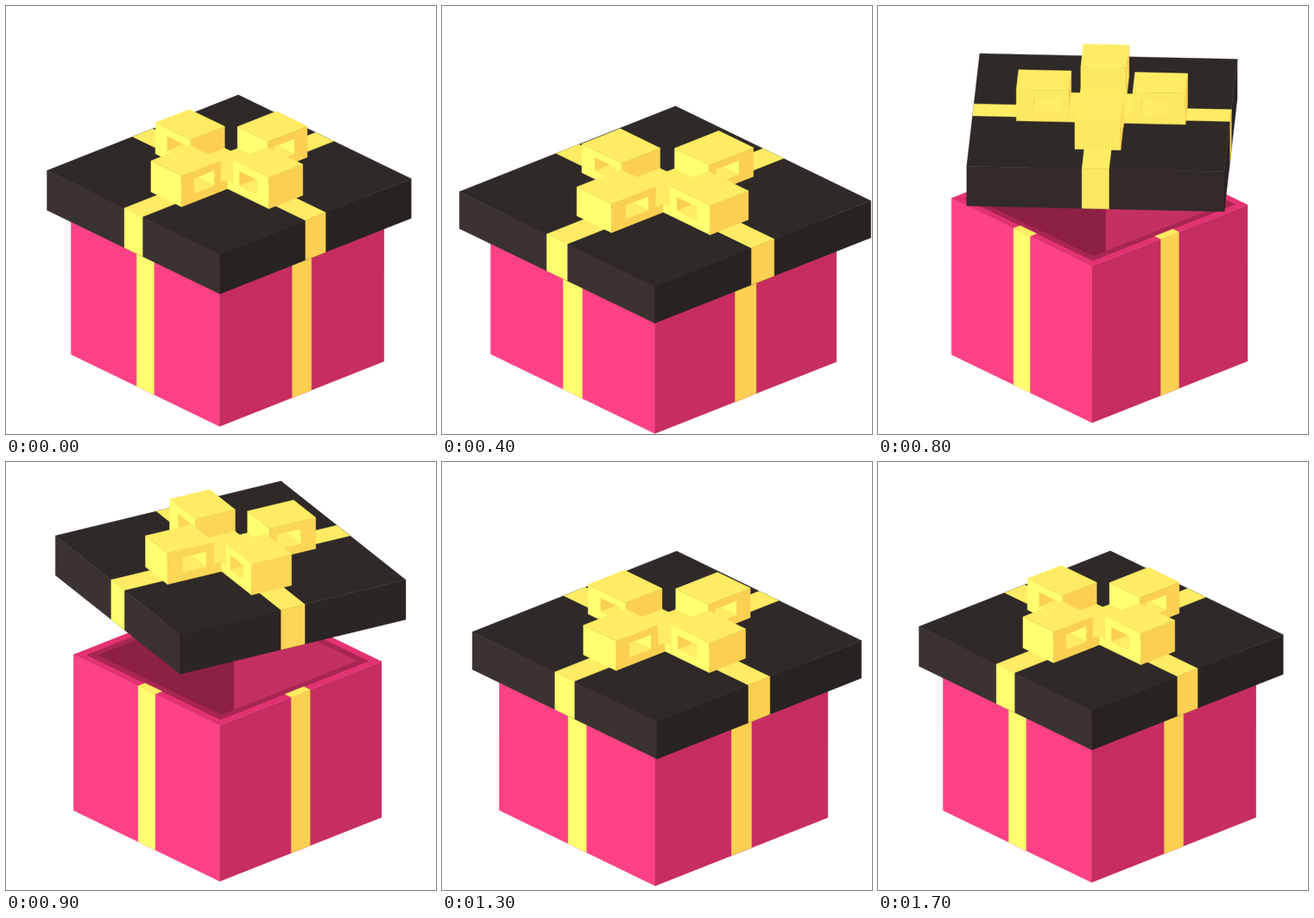
These frames come from a looping animation (498 px wide and 495 px high, 1800 ms). An HTML page with a canvas:

```html
<!DOCTYPE html>
<html>
<head>
<meta charset="utf-8">
<title>Gift box</title>
<style>
  html, body { margin: 0; overflow: hidden; background: #fff; }
  canvas { display: block; }
</style>
</head>
<body>
<canvas id="stage" width="498" height="495"></canvas>
<script>
const ctx = document.getElementById('stage').getContext('2d');
const LOOP = 1800, STEP = 100, QUARTER = Math.PI / 2;
const YAW = 42.1 * Math.PI / 180, SIN_PITCH = 0.437, COS_PITCH = 0.9;

// Colours as [top, left side, right side]
const PINK = [[226, 50, 113], [255, 66, 133], [198, 45, 97]];
const DARK = [[47, 42, 40], [59, 51, 48], [40, 35, 33]];
const GOLD = [[255, 236, 100], [255, 255, 112], [251, 208, 82]];
const LIP = [168, 38, 82], INSIDE_DARK = [140, 32, 69], INSIDE_LIGHT = [196, 48, 98];

const clamp = u => Math.max(0, Math.min(1, u));
const inOut = u => (1 - Math.cos(Math.PI * u)) / 2;
const out = u => 1 - (1 - u) ** 1.67;

// Every motion is a sum of 0-to-1 ramps over the phases of the jump
function poseAt(t) {
  const ramp = (from, to, ease = inOut) => ease(clamp((t - from) / (to - from)));
  const recover = ramp(1400, 1700);
  const crouch = ramp(0, 400) - ramp(400, 600);
  const stretch = ramp(400, 600) - ramp(600, 1000);
  const fall = ramp(1000, 1400);
  const land = fall - recover;
  const press = ramp(1200, 1400) - recover;
  const turn = ramp(600, 1000);
  return {
    body: {
      wide: 1 + 0.105 * crouch - 0.108 * stretch + 0.1 * press,
      tall: 1 - 0.13 * crouch + 0.01 * stretch - 0.12 * press
    },
    lid: {
      x: 258.4 + 2 * (turn - recover),
      y: 195 + 25 * ramp(0, 400) - 115 * ramp(400, 1000, out) + 113 * fall - 23 * recover,
      wide: 1 + 0.13 * crouch + 0.08 * land,
      tall: 1 - 0.07 * crouch - 0.06 * land,
      // The lid looks the same after every quarter turn
      yaw: (YAW + QUARTER * turn) % QUARTER
    }
  };
}

// Orthographic view: r runs back-right, l runs back-left, h runs up
function view(cx, cy, wide, tall, yaw) {
  const c = Math.cos(yaw), s = Math.sin(yaw);
  const project = ([r, l, h]) => [
    cx + wide * (r * c - l * s),
    cy - wide * SIN_PITCH * (r * s + l * c) - tall * COS_PITCH * h
  ];
  const shade = (palette, nx) => {
    const u = clamp((nx + Math.cos(YAW)) / (Math.cos(YAW) + Math.sin(YAW)));
    return palette[1].map((a, i) => a + (palette[2][i] - a) * u);
  };
  return {
    project,
    top: p => p[0],
    left: p => shade(p, -c),
    right: p => shade(p, s)
  };
}

function trace(v, corners) {
  ctx.beginPath();
  corners.forEach(c => ctx.lineTo(...v.project(c)));
  ctx.closePath();
}

function poly(v, color, corners) {
  trace(v, corners);
  ctx.fillStyle = ctx.strokeStyle = `rgb(${color.map(Math.round)})`;
  ctx.lineWidth = 0.4;
  ctx.fill();
  ctx.stroke();
}

function clipped(v, corners, paint) {
  ctx.save();
  trace(v, corners);
  ctx.clip();
  paint();
  ctx.restore();
}

const flat = (r0, r1, l0, l1, h) => [[r0, l0, h], [r1, l0, h], [r1, l1, h], [r0, l1, h]];
const leftWall = (r, l0, l1, h0, h1) => [[r, l0, h0], [r, l1, h0], [r, l1, h1], [r, l0, h1]];
const rightWall = (l, r0, r1, h0, h1) => [[r0, l, h0], [r1, l, h0], [r1, l, h1], [r0, l, h1]];

function block(v, p, r0, r1, l0, l1, h0, h1) {
  poly(v, v.left(p), leftWall(r0, l0, l1, h0, h1));
  poly(v, v.right(p), rightWall(l0, r0, r1, h0, h1));
  poly(v, v.top(p), flat(r0, r1, l0, l1, h1));
}

function bandSides(v, half, w, h0, h1) {
  poly(v, v.left(GOLD), leftWall(-half, -w, w, h0, h1));
  poly(v, v.right(GOLD), rightWall(-half, -w, w, h0, h1));
}

// Gold strips on top, from one distance to another along both axes
function bandTops(v, from, to, w, h) {
  poly(v, v.top(GOLD), flat(from, to, -w, w, h));
  poly(v, v.top(GOLD), flat(-w, w, from, to, h));
}

const BOW = { near: 37, far: 98, w: 26.5, height: 40, knot: 12, depth: 45 };

// One bow loop: a block along r or l with a recess in its open side
function bowLoop(v, alongR, sign) {
  const { near, far, w, height, knot, depth } = BOW;
  const span = (a, b) => sign > 0 ? [a, b] : [-b, -a];
  const bar = (a, b, h) => alongR
    ? block(v, GOLD, ...span(a, b), -w, w, 0, h)
    : block(v, GOLD, -w, w, ...span(a, b), 0, h);
  const [a, b] = span(near + 10, far - 20), low = 11, high = 30;
  const wall = inset => alongR
    ? rightWall(inset - w, a, b, low, high)
    : leftWall(inset - w, a, b, low, high);
  const floor = alongR
    ? flat(a, b, -w, depth - w, low)
    : flat(-w, depth - w, a, b, low);

  if (sign < 0) bar(w, near, knot);
  bar(near, far, height);
  clipped(v, wall(0), () => {
    poly(v, alongR ? v.left(GOLD) : v.right(GOLD), wall(0));
    poly(v, alongR ? v.right(GOLD) : v.left(GOLD), wall(depth));
    poly(v, v.top(GOLD), floor);
  });
  if (sign > 0) bar(w, near, knot);
}

function drawBody({ wide, tall }) {
  const v = view(256.6, 407, wide, tall, YAW);
  const s = 128.3, h = 200, w = 14.9, rim = s - 11, well = s - 20;
  const opening = flat(-well, well, -well, well, h);
  block(v, PINK, -s, s, -s, s, 0, h);
  poly(v, LIP, flat(-rim, rim, -rim, rim, h));
  clipped(v, opening, () => {
    poly(v, INSIDE_DARK, opening);
    poly(v, INSIDE_LIGHT, leftWall(well, -s, well, 0, h));
  });
  bandSides(v, s, w, 0, h);
  bandTops(v, -s, -rim, w, h);
}

function drawLid({ x, y, wide, tall, yaw }) {
  const v = view(x, y, wide, tall, yaw);
  const s = 149.3, w = 15.7, drop = -51;
  block(v, DARK, -s, s, -s, s, drop, 0);
  bandTops(v, -s, s, w, 0);
  bandSides(v, s, w, drop, 0);

  // Far loops, knot, near loops
  const rIsDeeper = yaw > QUARTER / 2;
  bowLoop(v, rIsDeeper, 1);
  bowLoop(v, !rIsDeeper, 1);
  block(v, GOLD, -BOW.w, BOW.w, -BOW.w, BOW.w, 0, BOW.knot);
  bowLoop(v, !rIsDeeper, -1);
  bowLoop(v, rIsDeeper, -1);
}

const start = performance.now();

function draw() {
  const elapsed = (performance.now() - start) % LOOP;
  const pose = poseAt(Math.floor(elapsed / STEP) * STEP);
  ctx.fillStyle = '#fff';
  ctx.fillRect(0, 0, 498, 495);
  drawBody(pose.body);
  drawLid(pose.lid);
  requestAnimationFrame(draw);
}

draw();
</script>
</body>
</html>
```
